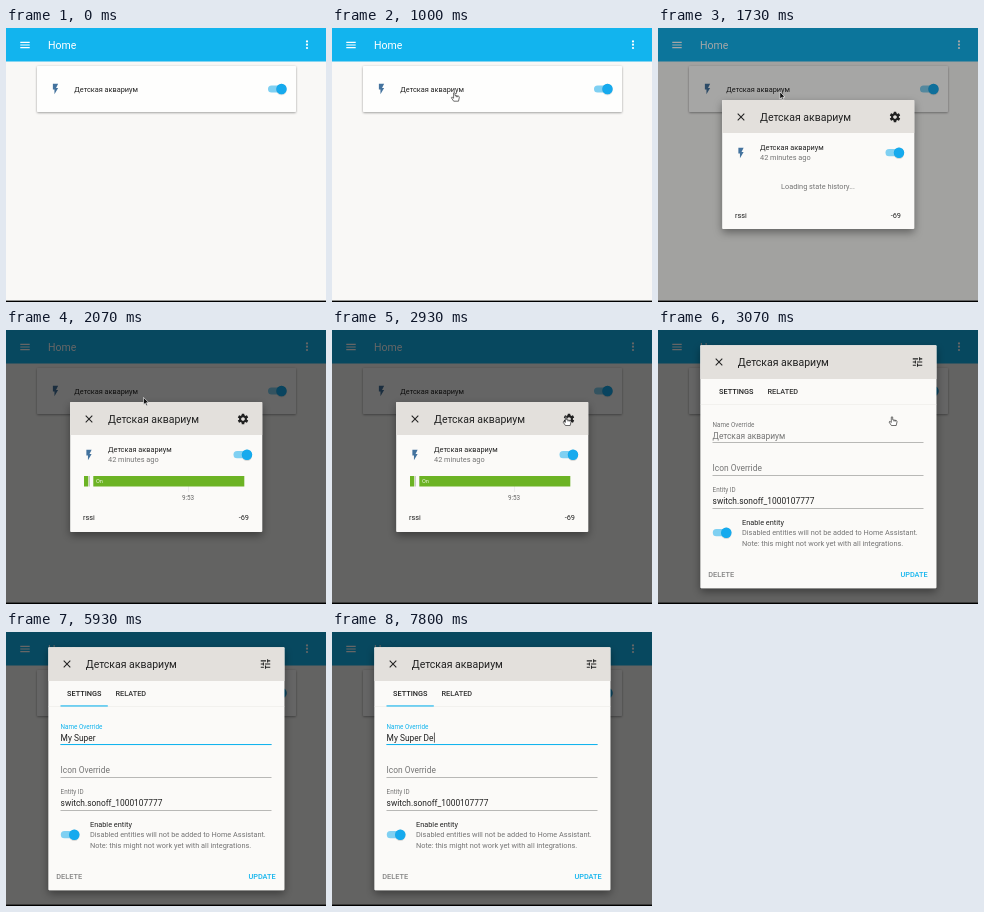
These frames come from a looping animation (320 by 274 pixels, 8 s). An HTML page:

```html
<!DOCTYPE html>
<html lang="en">
<head>
<meta charset="utf-8">
<style>
html, body { margin: 0; width: 100%; height: 100%; overflow: hidden; background: #f9f8f6; }
svg { display: block; width: 100%; height: 100%; font-family: Roboto, sans-serif; }
text { white-space: pre; }
</style>
</head>
<body>
<svg id="stage" viewBox="0 0 320 274" preserveAspectRatio="none"></svg>
<script>
const LOOP = 8000, BLUE = '#12b4ee', INK = '#212121', GREY = '#747474';
const PAPER = '#fbfaf8', BAR = '#e3e0dc';
const NAME = 'Детская аквариум';

const rect = (x, y, w, h, fill, more = '') =>
  `<rect x="${x}" y="${y}" width="${w}" height="${h}" fill="${fill}" ${more}/>`;
const text = (x, y, size, s, fill = INK, more = '') =>
  `<text x="${x}" y="${y}" font-size="${size}" fill="${fill}" ${more}>${s}</text>`;
const icon = (x, y, d, fill) =>
  `<path transform="translate(${x} ${y}) scale(.525) translate(-12 -12)" d="${d}" fill="${fill}"/>`;
const toggle = (x, y) =>
  rect(x - 13.5, y - 3.6, 17, 7.2, '#7fd0f2', 'rx="3.6"') +
  `<circle cx="${x}" cy="${y}" r="5.2" fill="#12aaee" filter="url(#soft)"/>`;
const group = (id, body) => `<g id="${id}">${body}</g>`;
const line = y => rect(54.5, y, 211, .6, '#8c8c8a');

const MENU = 'M3 6H21V8H3ZM3 11H21V13H3ZM3 16H21V18H3Z';
const FLASH = 'M7 2V13H10V22L17 10H13L17 2Z';
const CLOSE = 'M19 6.4L17.6 5 12 10.6 6.4 5 5 6.4 10.6 12 5 17.6 6.4 19 12 13.4 17.6 19 19 17.6 13.4 12Z';
const TUNE = 'M3 17V19H9V17ZM3 5V7H13V5ZM13 21V19H21V17H13V15H11V21ZM7 9V11H3V13H7V15H9V9ZM21 13V11H11V13ZM15 9H17V7H21V5H17V3H15Z';
const cog = (x, y) => {
  let teeth = '';
  for (let a = 0; a < 360; a += 60)
    teeth += `<rect x="-1.3" y="-5.3" width="2.6" height="3" rx=".3" transform="rotate(${a})"/>`;
  return `<g transform="translate(${x} ${y})" fill="${INK}">${teeth}<circle r="2.9" fill="none" stroke="${INK}" stroke-width="2.1"/></g>`;
};

const home =
  rect(0, 0, 320, 274, '#f9f8f6') + rect(0, 0, 320, 33.5, BLUE) +
  icon(19, 17, MENU, '#fff') + text(42, 20.6, 10.5, 'Home', '#fff') +
  [13.4, 16.7, 20].map(y => `<circle cx="301" cy="${y}" r="1.1" fill="#fff"/>`).join('') +
  rect(31, 38, 259, 46, '#fefefd', 'rx="1" filter="url(#card)"') +
  icon(49.5, 61, FLASH, '#44739e') + text(68.3, 63.6, 7.35, NAME) + toggle(275.5, 61);

const history =
  rect(182, 146, .5, 16, '#ddd') + rect(78, 146, 4.3, 10.5, '#6cb324') +
  rect(83.3, 146, .5, 10.5, '#999') + rect(87.3, 146, 151, 10.5, '#6cb324') +
  text(90, 153, 5.6, 'On', '#eef7e2') +
  text(182, 170, 6.3, '9:53', '#666', 'text-anchor="middle"');

const info =
  `<rect id="infoBox" x="64.2" y="72" width="192" fill="${PAPER}" rx="1" filter="url(#lift)"/>` +
  rect(64.2, 72, 192, 33, BAR) + icon(83, 89, CLOSE, INK) +
  text(102, 92.5, 10.5, NAME) + cog(237, 89) +
  icon(83, 125, FLASH, '#44739e') + text(102, 122, 7.35, NAME) +
  text(102, 132.2, 7.35, '42 minutes ago', GREY) + toggle(241, 124.7) +
  group('loading', text(160, 161.4, 7.35, 'Loading state history...', GREY, 'text-anchor="middle"')) +
  group('history', history) +
  text(77, 190.3, 7.35, 'rssi') + text(243, 190.3, 7.35, '-69', INK, 'text-anchor="end"');

const settings =
  rect(42.4, 15.3, 236, 243, PAPER, 'rx="1" filter="url(#lift)"') +
  rect(42.4, 15.3, 236, 33.7, BAR) + icon(61, 32, CLOSE, INK) +
  text(79.8, 35.7, 10.5, NAME) + icon(259.5, 32, TUNE, INK) +
  text(61, 64.2, 7.35, 'SETTINGS', INK, 'font-weight="500"') +
  text(109.5, 64.2, 7.35, 'RELATED', '#333', 'font-weight="500"') +
  rect(42.4, 74.2, 236, .5, '#e8e6e3') +
  group('tabLine', rect(54.5, 73.4, 47.3, 1.1, BLUE)) +
  text(54.6, 97, 6.3, 'Name Override', GREY, 'id="label"') +
  text(54.6, 108.7, 8.4, NAME, GREY, 'id="field"') + line(112.4) +
  `<rect id="focusLine" y="112" height="1.05" fill="${BLUE}"/>` +
  text(54.6, 141.4, 8.4, 'Icon Override', GREY) + line(145.2) +
  text(54.6, 162.2, 6.3, 'Entity ID', GREY) +
  text(54.6, 173.8, 8.4, 'switch.sonoff_1000107777') + line(178) +
  toggle(68.3, 202.7) + text(84, 194.8, 7.35, 'Enable entity') +
  text(84, 205.3, 7.35, 'Disabled entities will not be added to Home Assistant.', GREY) +
  text(84, 215.5, 7.35, 'Note: this might not work yet with all integrations.', GREY) +
  text(50.3, 247, 7.35, 'DELETE', '#848484', 'font-weight="500"') +
  text(269.7, 247, 7.35, 'UPDATE', BLUE, 'font-weight="500" text-anchor="end"') +
  rect(0, 100.6, .7, 10, INK, 'id="caret"');

const pointer =
  group('arrow', '<path d="M0 0V7.2L1.7 5.7 2.8 8.2 4 7.7 2.9 5.2H5.2Z" fill="#111" stroke="#fff" stroke-width=".6"/>') +
  group('hand', '<path d="M-.7 .6Q0-.5 .7 .6V3.3L4.4 4Q5.2 4.3 5 5.4L4.2 9H-.6L-2.9 5.6Q-2.7 4.5-1.7 5.2L-.7 6ZM2 3.6V5M3.4 3.9V5" fill="#fff" stroke="#222" stroke-width=".65"/>') +
  group('beam', '<path d="M-1.3-3Q0-3 0-2.2Q0-3 1.3-3M0-2.2V2.2M-1.3 3Q0 3 0 2.2Q0 3 1.3 3" fill="none" stroke="#666" stroke-width=".6"/>');

const shadow = (id, dy, blur, alpha) =>
  `<filter id="${id}" x="-20%" y="-20%" width="140%" height="150%"><feDropShadow dx="0" dy="${dy}" stdDeviation="${blur}" flood-opacity="${alpha}"/></filter>`;

stage.innerHTML =
  `<defs>${shadow('soft', .4, .5, .35)}${shadow('card', .8, .9, .4)}${shadow('lift', 3.5, 4, .4)}</defs>` +
  home + rect(0, 0, 320, 274, '#000', 'id="dim"') +
  group('info', info) + group('settings', settings) +
  rect(0, 272.6, 320, 1.4, '#000') + group('pointer', pointer);

const $ = id => document.getElementById(id);
const set = (id, attrs) => { for (const k in attrs) $(id).setAttribute(k, attrs[k]); };
const show = (id, on) => set(id, { display: on ? 'inline' : 'none' });
const ramp = (t, a, b) => Math.min(1, Math.max(0, (t - a) / (b - a)));
const ease = p => p * p * (3 - 2 * p);
const easeOut = p => 1 - (1 - p) ** 2;

// Moments of the story, in ms
const OPEN = 1660, LOADED = 2000, EDIT = 3000, TAB = 3130, FOCUS = 3870, HIDE = 5600;
const BLINK = 530;

// Pointer path: time, x, y
const PATH = [
  [330, 150, 194], [730, 126, 77], [870, 126, 77], [1000, 122.3, 64.2], [1470, 122.3, 64.2],
  [1600, 121.8, 63.8], [1800, 121.8, 63.8], [2130, 139, 67.8], [2270, 139, 67.8],
  [2730, 234, 86.5], [3400, 234, 86.5], [3730, 168.5, 103]
];
const TYPED = [[5070, 'My'], [5400, 'My Super '], [6400, 'My Super De']];

function pointAt(t) {
  const i = PATH.findIndex(p => p[0] > t);
  if (i < 0) return PATH[PATH.length - 1].slice(1);
  if (!i) return PATH[0].slice(1);
  const [a, x, y] = PATH[i - 1], [b, u, v] = PATH[i], p = ease(ramp(t, a, b));
  return [x + (u - x) * p, y + (v - y) * p];
}

function movePointer(t) {
  const [x, y] = pointAt(t);
  const overRow = t < 1600 && y < 84;
  const overCog = t >= 1600 && x > 231;
  const kind = overRow || overCog ? 'hand' : t >= EDIT && y > 97 ? 'beam' : 'arrow';
  show('pointer', t >= 330 && t < HIDE);
  set('pointer', { transform: `translate(${x.toFixed(2)} ${y.toFixed(2)})` });
  for (const k of ['arrow', 'hand', 'beam']) show(k, k === kind);
}

function editField(t) {
  const focused = t >= FOCUS, grow = ease(ramp(t, FOCUS, FOCUS + 250));
  set('label', { fill: focused ? BLUE : GREY });
  set('focusLine', { x: 160 - 105.5 * grow, width: 211 * grow });

  const [since, typed] = TYPED.filter(k => k[0] <= t).pop() || [FOCUS - 60, ''];
  const field = $('field'), value = typed || NAME;
  if (field.textContent !== value) field.textContent = value;
  set('field', { fill: typed ? INK : GREY });

  // The caret restarts its blink with every key
  const caretOn = focused && Math.floor((t - since) / BLINK) % 2 === 0;
  show('caret', caretOn);
  if (caretOn) set('caret', { x: typed ? 55 + field.getComputedTextLength() : 54.4 });
}

function update(t) {
  const edit = t >= EDIT, loaded = t >= LOADED;
  set('dim', { opacity: .6 * easeOut(ramp(t, OPEN, OPEN + 200)) });
  show('info', t >= OPEN && !edit);
  set('infoBox', { height: loaded ? 130 : 129 });
  show('loading', !loaded);
  show('history', loaded);
  show('settings', edit);
  show('tabLine', t >= TAB);
  if (edit) editField(t);
  movePointer(t);
}

const start = performance.now();
function tick() {
  update((performance.now() - start) % LOOP);
  requestAnimationFrame(tick);
}
tick();
</script>
</body>
</html>
```
